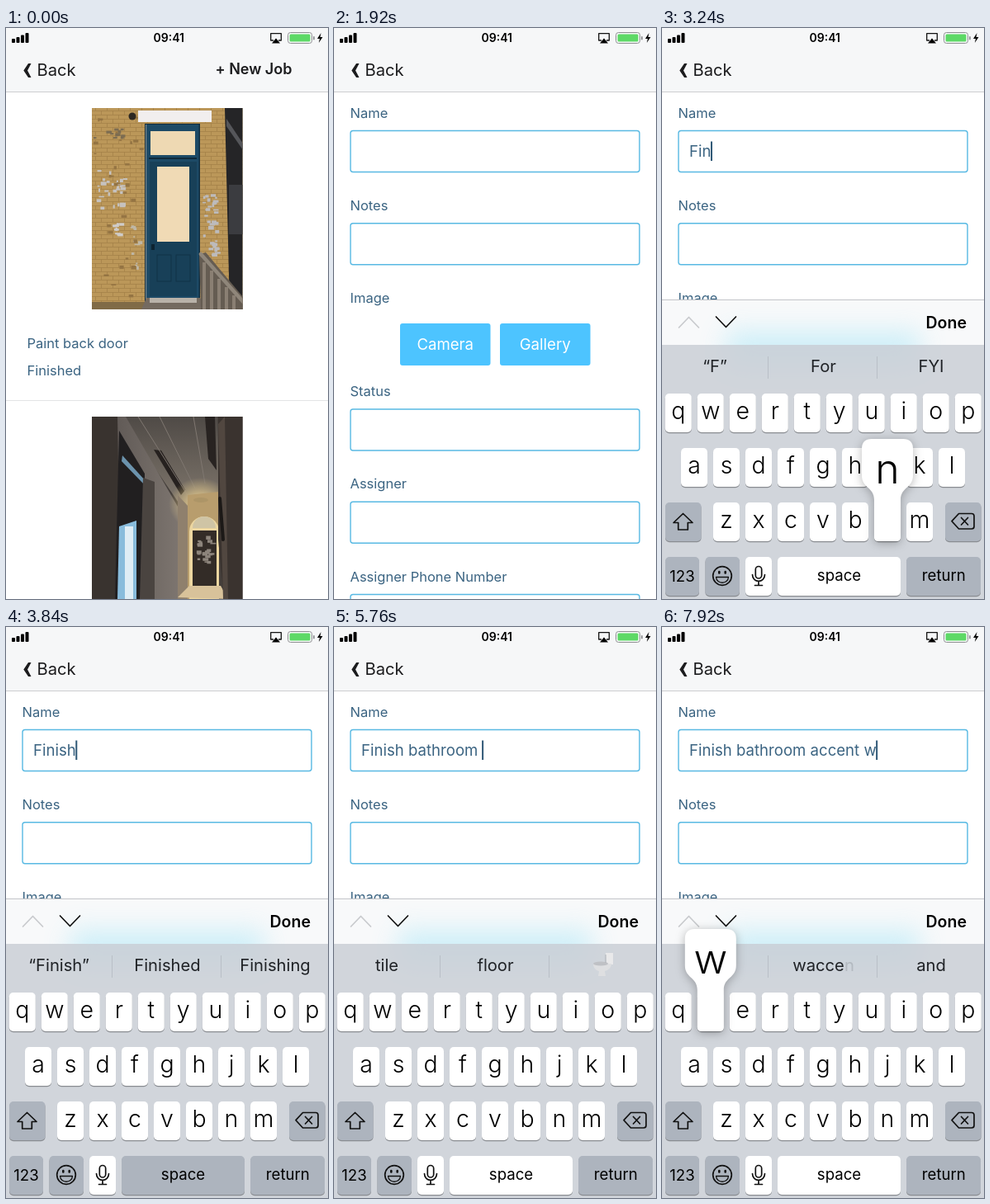
An HTML page for the animation above (8 s loop, 390x692 px).

```html
<!DOCTYPE html>
<html lang="en">
<head>
<meta charset="utf-8">
<title>New job form</title>
<style>
html, body { margin: 0; width: 100%; height: 100%; overflow: hidden; background: #fff; }
svg { display: block; width: 100%; height: 100%; }
text { font-family: Inter, "Open Sans", sans-serif; white-space: pre; }
.mid { text-anchor: middle; }
.label { font-size: 16.5px; fill: #3b6482; }
.nav { font-size: 20.2px; fill: #1c1c1e; }
.key { font-size: 28.5px; font-weight: 350; text-anchor: middle; }
.word { font-size: 18.6px; }
.hint { font-size: 20.2px; fill: #1f2226; text-anchor: middle; }
.line { fill: none; stroke: #111; stroke-width: 1.7; stroke-linecap: round; stroke-linejoin: round; }
#pop path { filter: drop-shadow(0 2px 6px rgba(0, 0, 0, .28)); }
</style>
</head>
<body>
<svg id="stage" viewBox="0 0 390 692" preserveAspectRatio="none"></svg>
<script>
const LOOP = 8000;
const PUSH = [720, 1200];
const RISE = [2050, 2450];

// [time, character]
const STROKES = [
  [2700, 'F'], [2960, 'i'], [3200, 'n'], [3360, 'i'], [3530, 's'], [3690, 'h'], [3850, ' '],
  [4020, 'b'], [4190, 'a'], [4350, 't'], [4520, 'h'], [4680, 'r'], [4850, 'o'], [5000, 'o'],
  [5160, 'm'], [5400, ' '], [5950, 'a'], [6150, 'c'], [6300, 'c'], [7060, 'e'], [7220, 'n'],
  [7400, 't'], [7640, ' '], [7880, 'w']
];

// [time, left, middle, right]
const HINTS = [
  [0, 'I', 'The', 'I’m'],
  [2900, '“F”', 'For', 'FYI'],
  [3420, '“Fin”', 'Find', 'Fine'],
  [3780, '“Finish”', 'Finished', 'Finishing'],
  [4020, 'the', 'my', 'up'],
  [4260, '“b”', 'being', 'before'],
  [4720, '“bath”', 'bathroom', 'baths'],
  [5200, '“bathroom”', 'bathrooms', 'bath'],
  [5520, 'tile', 'floor', '*'],
  [6120, '“a”', 'and', 'at'],
  [6560, '“acc”', 'access', 'accidentally'],
  [7240, '“accent”', 'accents', 'accented'],
  [7760, 'wall', 'wacce~n', 'and']
];

const ROWS = [
  { keys: 'qwertyuiop', x: 19.8, y: 443 },
  { keys: 'asdfghjkl', x: 39, y: 509 },
  { keys: 'zxcvbnm', x: 78, y: 575 }
];
const PITCH = 39;

const rect = (x, y, w, h, fill, more = '') =>
  `<rect x="${x}" y="${y}" width="${w}" height="${h}" fill="${fill}" ${more}/>`;
const poly = (points, fill) => `<polygon points="${points}" fill="${fill}"/>`;
const text = (x, y, cls, str, more = '') => `<text x="${x}" y="${y}" class="${cls}" ${more}>${str}</text>`;
const line = (d, more = '') => `<path class="line" d="${d}" ${more}/>`;
const cap = (x, y, w, fill = '#fff', id = '') =>
  rect(x, y + 1.2, w, 47, '#898c91', 'rx="5"') + rect(x, y, w, 47, fill, `rx="5" ${id}`);

let seed = 7;
const random = () => (seed = seed * 16807 % 2147483647) / 2147483647;
const flecks = (count, x, y, w, h, fill) => Array.from({ length: count }, () =>
  rect(x + w * random(), y + h * random(), 2 + 5 * random(), 1.5 + 3 * random(), fill)).join('');

const defs = `<defs>
  <pattern id="brick" width="14" height="10" patternUnits="userSpaceOnUse">
    <rect width="14" height="10" fill="#bb9759"/>
    <path d="M0 .5H14M0 5.5H14M3.5 0V5M10.5 5V10" stroke="#a58149" stroke-width=".8"/>
  </pattern>
  <linearGradient id="wall" x2="1">
    <stop stop-color="#56504d"/><stop offset="1" stop-color="#7f7771"/>
  </linearGradient>
  <linearGradient id="ceiling" x2="0" y2="1">
    <stop stop-color="#4f4a46"/><stop offset="1" stop-color="#857c71"/>
  </linearGradient>
  <radialGradient id="lamp"><stop stop-color="#f3d793"/><stop offset="1" stop-color="#f3d793" stop-opacity="0"/></radialGradient>
  <filter id="blur" x="-30%" y="-150%" width="160%" height="400%"><feGaussianBlur stdDeviation="16"/></filter>
  <clipPath id="shot"><rect x="104" y="471" width="182.5" height="244"/></clipPath>
  <clipPath id="shotTop"><rect x="104" y="97" width="182.5" height="244"/></clipPath>
  <clipPath id="lastCell"><rect x="263" y="384" width="127" height="56"/></clipPath>
</defs>`;

const header = rect(0, 0, 390, 77, '#f6f7f8') + rect(0, 77, 390, 1, '#cdced1') +
  '<path d="M30.5 43H27L21.3 51.5L27 60H30.5L26 51.5Z" fill="#1c1c1e"/>' + text(37.5, 58, 'nav', 'Back');

const statusBar = () => {
  const bars = [5, 7, 9.5, 12].map((h, i) => rect(7 + i * 5.5, 18 - h, 4, h, '#000', 'rx="1"')).join('');
  return bars + text(197.3, 17, 'mid', '09:41', 'font-size="14" font-weight="600"') +
    line('M323.5 15H320.7V6.7H333.3V15H330.5', 'style="stroke-width:1.3"') +
    poly('322,18.5 327,12.5 332,18.5', '#000') +
    rect(341.5, 5.5, 29, 13, 'none', 'rx="3" stroke="#8e8f92"') +
    rect(343.5, 7.5, 25, 9, '#5dd966', 'rx="1.5"') +
    rect(372, 10, 1.8, 4.5, '#8e8f92', 'rx=".9"') +
    poly('381.5,6 377,13 380,13 378.8,18 383.5,11 380.5,11', '#000');
};

const doorPhoto = () => '<g clip-path="url(#shotTop)">' + rect(104, 97, 183, 244, 'url(#brick)') +
  flecks(14, 106, 121, 36, 12, '#7c6c51') +
  flecks(28, 108, 172, 34, 46, '#c6c2bf') + flecks(10, 122, 236, 16, 14, '#cfccca') +
  flecks(12, 150, 235, 10, 55, '#bfb7a6') + flecks(36, 238, 200, 16, 82, '#bdbbbc') +
  flecks(30, 104, 97, 58, 235, '#947443') +
  poly('265,97 287,97 287,341 271,341', '#252527') +
  poly('267,110 287,140 287,148 267,119', '#55565a') + rect(270, 190, 17, 60, '#3b3c40') +
  rect(160, 100, 89, 14, '#f1eeee') + '<circle cx="153" cy="107" r="4.5" fill="#2d2822"/>' +
  rect(168, 116, 67, 216, '#122e40') + rect(169.5, 117, 64, 212, '#1d4a66') +
  rect(175, 125, 54, 29, '#eed9b3') + rect(173, 157, 58, 2, '#0f2a3b') +
  rect(174, 162, 57, 163, '#184058') + rect(183, 168, 39, 91, '#f0dab5') +
  [183, 206].map(x => rect(x, 275, 17, 32, 'none', 'stroke="#113247"')).join('') +
  rect(176, 262, 4, 7, '#0e2431') + rect(169, 117, 1.2, 212, '#c9c5bd', 'opacity=".55"') +
  poly('104,332 168,332 168,341 104,341', '#806b47') +
  poly('170,327 235,327 244,341 164,341', '#746a60') + rect(174, 327, 57, 6, '#b9b2a9') +
  poly('234,274 242,272 287,326 287,341 236,341', '#655c52') +
  [238, 247, 256, 265, 274].map((x, i) => rect(x, 284 + i * 10, 4, 60, '#8a7f73')).join('') +
  line('M236 274L290 335', 'style="stroke:#8f867a;stroke-width:4.5"') + '</g>';

const hallPhoto = () => '<g clip-path="url(#shot)">' + rect(104, 471, 183, 244, '#453f3b') +
  poly('138,471 256,471 259,562 219,590', 'url(#ceiling)') +
  poly('104,471 145,471 215,592 215,692 104,692', 'url(#wall)') +
  poly('104,471 135,471 139,692 104,692', '#39332f') +
  poly('137,488 168,540 168,692 132,692', '#211f20') +
  poly('137,604 158,597 158,692 135,692', '#89bcdc') + rect(144, 604, 10, 88, '#dfedf5') +
  poly('141,518 169,549 169,555 140,525', '#6c93ad') +
  poly('166,545 180,550 180,692 162,692', '#4a4440') +
  poly('179,511 188,512 217,560 212,566', '#26211f') +
  poly('241,471 253,471 255,536 245,522', '#282321') +
  line('M160 471L221 568M186 471L229 558M227 471L241 552', 'style="stroke:#7f7770;stroke-width:1"') +
  '<ellipse cx="235" cy="577" rx="38" ry="32" fill="url(#lamp)"/>' +
  poly('208,566 221,580 221,692 208,692', '#8f806d') +
  poly('220,566 258,562 258,692 220,692', '#b89d6d') +
  '<ellipse cx="236" cy="572" rx="9" ry="3" fill="#ad9567"/>' +
  '<path d="M222 692V610a18 18 0 0 1 36 0V692Z" fill="#ecd6a0"/>' +
  '<path d="M226 606a14 14 0 0 1 28 0Z" fill="#cfc4a5"/>' + rect(226, 609, 29, 70, '#332c27') +
  flecks(24, 230, 614, 18, 34, '#8d857c') +
  poly('208,690 222,676 260,676 269,692', '#d8c29a') +
  poly('257,471 287,471 287,692 264,692 257,620', '#3a332f') +
  poly('257,480 265,471 269,692 263,692', '#514740') +
  line('M259 570L263 620', 'style="stroke:#1c1917;stroke-width:4"') + '</g>';

const listPage = () => rect(0, 0, 390, 692, '#fff') + doorPhoto() +
  text(25.5, 388, 'label', 'Paint back door') + text(25.5, 421, 'label', 'Finished') +
  rect(0, 451, 390, 1, '#e3e4e6') + hallPhoto() + header +
  text(253.5, 56, 'nav', '+ New Job', 'style="font-size:18px;font-weight:600"');

const formPage = () => {
  const fields = [['Name', 108.5], ['Notes', 220.8], ['Image', 333], ['Status', 446], ['Assigner', 558.3],
    ['Assigner Phone Number', 670.5]];
  const box = y => rect(20, y + 16, 350, 50, '#fff', 'rx="3" stroke="#58b9e3" stroke-width="1.4"');
  const button = (x, name) => rect(x, 358, 109.5, 51, '#4dc4ff', 'rx="3"') +
    text(x + 54.7, 390, 'word mid', name, 'fill="#fff"');
  return rect(0, 0, 390, 692, '#fff') +
    fields.map(([name, y]) => text(19.5, y, 'label', name) + (name === 'Image' ? '' : box(y))).join('') +
    button(80, 'Camera') + button(201, 'Gallery') + header +
    text(33, 155.5, 'word', '', 'id="typed" fill="#3b6482"') +
    rect(0, 137.5, 2, 23.5, '#2f5876', 'id="caret"');
};

const eachKey = draw => ROWS.map(({ keys, x, y }) =>
  [...keys].map((k, i) => draw(k, x + PITCH * i, y)).join('')).join('');

const keyboard = () => {
  const dark = '#adb4be';
  const glyphs = eachKey((k, x, y) => text(x, y + 31, 'key', k));
  const capitals = eachKey((k, x, y) => text(x, y + 33, 'key', k.toUpperCase()));
  const arrow = 'M25.5 588.5L37 599.5H31.3V608H19.7V599.5H14Z';
  return rect(0, 330, 390, 362, '#f8f9fa') +
    rect(78, 368, 234, 42, '#7fdcf5', 'opacity=".36" filter="url(#blur)"') +
    rect(0, 384, 390, 308, '#cacfd6', 'opacity=".84"') +
    rect(0, 329, 390, 1, '#c3c5c9') +
    line('M20.5 363L32.5 350.5L44.5 363', 'style="stroke:#c8cacd"') + line('M65.5 350L77.5 362.5L89.5 350') +
    text(319.5, 364, '', 'Done', 'font-size="19.5" font-weight="600"') +
    rect(128, 398, 1, 27, '#b9bfc7') + rect(260, 398, 1, 27, '#b9bfc7') +
    text(64, 417, 'hint', '', 'id="hint1"') + text(195.5, 417, 'hint', '', 'id="hint2"') +
    `<g clip-path="url(#lastCell)">${text(326, 417, 'hint', '', 'id="hint3"')}</g>` +
    `<g id="toilet"><path d="M329 395h9v14h-8z" fill="#e9e9ea"/><path d="M314 408h22c0 5-4 8-8 9l1 6h-9l1-6c-4-1-7-4-7-9z" fill="#dedfe1"/>
      <ellipse cx="323" cy="408" rx="9" ry="2.5" fill="#bfc1c5"/><path d="M329 397v10" stroke="#aeb1b6"/></g>` +
    eachKey((k, x, y) => cap(x - 16, y, 32)) +
    `<g id="lower">${glyphs}</g><g id="upper">${capitals}</g>` +
    cap(4, 575, 43.5, dark, 'id="shiftKey"') + line(arrow, 'id="shiftIcon"') +
    cap(343, 575, 43.5, dark) +
    line('M359.5 588.5H375Q378 588.5 378 591.5V604Q378 607 375 607H359.5L351 597.7ZM362.5 593.5L370.5 602M370.5 593.5L362.5 602') +
    cap(4, 641, 41, dark) + text(24.5, 671, 'word mid', '123') +
    cap(52.5, 641, 41.5, dark) + '<circle class="line" cx="73" cy="664" r="11.3"/>' +
    line('M65.5 665.5H80.5C80 674.5 66 674.5 65.5 665.5Z', 'style="stroke-width:1.3"') +
    line('M69.3 659V660.5M76.7 659V660.5', 'style="stroke-width:2.6"') +
    cap(101, 641, 32) + rect(113.3, 652.5, 7.4, 14.5, 'none', 'rx="3.7" stroke="#111" stroke-width="1.7"') +
    line('M109.5 662.5C109.5 673 124.5 673 124.5 662.5M117 670.5V675.5M112.5 675.5H121.5') +
    cap(140, 641, 149, '#fff', 'id="spaceKey"') + text(214.5, 670, 'word mid', 'space') +
    cap(296, 641, 90, dark) + text(341.3, 670, 'word mid', 'return') +
    `<g id="pop"><path d="M-31 12q0-12 12-12h38q12 0 12 12V44c0 16-15 14-15 30V119q0 5-5 5h-22q-5 0-5-5V74c0-16-15-14-15-30z" fill="#fff"/>
      ${text(0, 54, 'key', '', 'id="popText" style="font-size:50px;font-weight:300"')}</g>`;
};

const stage = document.getElementById('stage');
stage.innerHTML = defs + `<g id="list">${listPage()}</g><g id="form">${formPage()}</g>
  <g id="board">${keyboard()}</g>${statusBar()}`;
const el = {};
stage.querySelectorAll('[id]').forEach(node => { el[node.id] = node; });

const set = (node, name, value) => node.setAttribute(name, value);
const show = (node, on) => set(node, 'visibility', on ? 'visible' : 'hidden');
const move = (node, x, y) => set(node, 'transform', `translate(${x} ${y})`);
const write = (node, str) => { if (node.textContent !== str) node.textContent = str; };
const ease = (t, [from, to]) => 1 - (1 - Math.min(1, Math.max(0, (t - from) / (to - from)))) ** 3;

function drawHints(t) {
  const [, left, middle, right] = HINTS.filter(h => h[0] <= t).pop();
  const [solid, faint = ''] = middle.split('~');
  write(el.hint1, left);
  el.hint2.innerHTML = `${solid}<tspan fill-opacity=".15">${faint}</tspan>`;
  write(el.hint3, right === '*' ? '' : right);
  set(el.hint3, 'x', right.length > 11 ? 318.5 : 326);
  show(el.toilet, right === '*');
}

function drawPress(t) {
  const hit = STROKES.find(([at]) => t >= at - 60 && t < at + 70);
  const char = hit ? hit[1] : '';
  set(el.spaceKey, 'fill', char === ' ' ? '#adb4be' : '#fff');
  const row = char.trim() && ROWS.find(r => r.keys.includes(char.toLowerCase()));
  show(el.pop, !!row);
  if (!row) return;
  move(el.pop, row.x + PITCH * row.keys.indexOf(char.toLowerCase()), row.y - 77);
  write(el.popText, char);
}

function draw(t) {
  const push = ease(t, PUSH);
  move(el.list, -117 * push, 0);
  move(el.form, 390 * (1 - push), 0);
  move(el.board, 0, 364 * (1 - ease(t, RISE)));

  const done = STROKES.filter(([at]) => at <= t);
  write(el.typed, done.map(s => s[1]).join(''));
  const since = t - (done.length ? done[done.length - 1][0] : RISE[0]);
  show(el.caret, since >= 0 && since % 1000 < 500);
  set(el.caret, 'x', 32.5 + (done.length ? el.typed.getComputedTextLength() : 0));

  const shifted = !done.length;
  show(el.upper, shifted);
  show(el.lower, !shifted);
  set(el.shiftKey, 'fill', shifted ? '#fff' : '#adb4be');
  el.shiftIcon.style.fill = shifted ? '#111' : 'none';
  drawHints(t);
  drawPress(t);
}

const start = performance.now();
function tick() {
  draw((performance.now() - start) % LOOP);
  requestAnimationFrame(tick);
}
tick();
</script>
</body>
</html>
```
